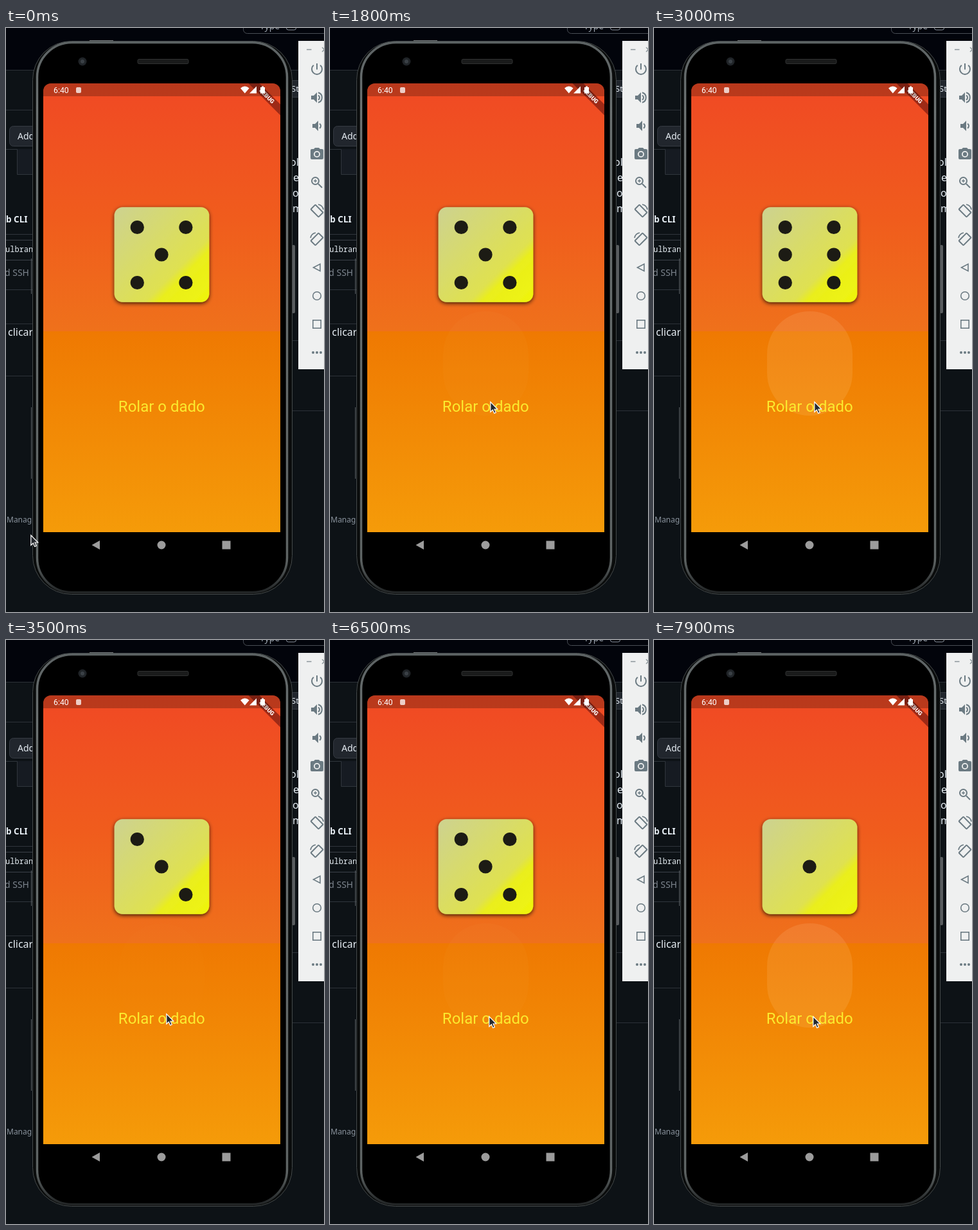
An HTML page for the animation above (8 s loop, 495 by 907 pixels).

```html
<!DOCTYPE html>
<html lang="pt">
<head>
<meta charset="utf-8">
<title>Rolar o dado</title>
<style>
  html, body { margin: 0; width: 100%; height: 100%; overflow: hidden; background: #0d1216; }
  svg { display: block; width: 495px; height: 907px; }
  .page { font-family: "Noto Sans", sans-serif; font-size: 14px; fill: #e6edf3; }
  .app { font-family: Roboto, sans-serif; }
  .icon { fill: none; stroke: #6b7a82; stroke-width: 2; }
  .icon .solid { fill: #6b7a82; stroke: none; }
</style>
</head>
<body>
<svg viewBox="0 0 495 907">
  <defs>
    <linearGradient id="sky" gradientUnits="userSpaceOnUse" x1="0" y1="86" x2="0" y2="783">
      <stop offset="0" stop-color="#f04924"/>
      <stop offset=".3" stop-color="#f05c1d"/>
      <stop offset=".552" stop-color="#ef711b"/>
      <stop offset=".553" stop-color="#ef7902"/>
      <stop offset="1" stop-color="#f59b09"/>
    </linearGradient>
    <linearGradient id="face" x1="0" y1="0" x2="1" y2="1">
      <stop offset="0" stop-color="#cdd290"/>
      <stop offset=".66" stop-color="#dfe150"/>
      <stop offset=".73" stop-color="#eaee1c"/>
      <stop offset="1" stop-color="#eff50d"/>
    </linearGradient>
    <linearGradient id="rim" x1="0" y1="0" x2="0" y2="1">
      <stop offset="0" stop-color="#5c6263"/>
      <stop offset=".12" stop-color="#6c7272"/>
      <stop offset=".94" stop-color="#5e6464"/>
      <stop offset="1" stop-color="#222526"/>
    </linearGradient>
    <filter id="shadow" x="-20%" y="-20%" width="140%" height="140%">
      <feDropShadow dx="0" dy="2" stdDeviation="3" flood-opacity=".75"/>
    </filter>
    <clipPath id="screen"><path d="M58 783V98a12 12 0 0 1 12-12H415a12 12 0 0 1 12 12V783z"/></clipPath>
  </defs>

  <!-- page behind the phone -->
  <g class="page">
    <rect width="495" height="907" fill="#0d1216"/>
    <rect width="495" height="65" fill="#02040b"/>
    <path d="M0 65.500H495M0 127.500H60M0 459.500H60M0 540.500H60M440 485.500H495M440 594.500H495" stroke="#2c3138"/>
    <rect x="369.500" y="-20" width="140" height="28.500" rx="6" fill="none" stroke="#4a4f56"/>
    <text x="395" y="2" fill="#9aa2ab">Type</text>
    <rect x="436.500" y="-12" width="15" height="15" rx="3" fill="none" stroke="#8b929b"/>
    <rect x="5.500" y="152.500" width="60" height="31" rx="6" fill="#21262d" stroke="#363b42"/>
    <text x="18" y="173" font-weight="500">Add</text>
    <path d="M17.500 188V227.500H60V188z" fill="#161b22"/>
    <path d="M0 188.500H17.500V227.500H60M0 320.500H60M0 406.500H60" fill="none" stroke="#30363d"/>
    <text x="0" y="302" font-size="13.500" font-weight="600">b CLI</text>
    <path d="M0 329.500H60M0 360.500H60" stroke="#3b4149"/>
    <text x="-1" y="348" font-family="Noto Sans Mono, monospace" font-size="12">ulbran</text>
    <text x="-2" y="385" fill="#7d858e">d SSH</text>
    <path d="M39.500 358V413M39.500 589V700" stroke="#5a5f64"/>
    <text x="3" y="478" font-size="16">clicar</text>
    <text x="1" y="768" font-size="12" fill="#8b949e">Manag</text>
    <rect x="430" y="81.500" width="40" height="26" rx="5" fill="#21262d" stroke="#363b42"/>
    <text x="444" y="99" font-size="13">St</text>
    <g font-size="16">
      <text x="442" y="214">ol</text><text x="447" y="238">e</text>
      <text x="446" y="262">o</text><text x="446" y="286">m</text>
    </g>
  </g>

  <!-- phone body -->
  <path d="M130 19.500H167" stroke="#777c7d"/>
  <rect x="445" y="337" width="5" height="106" rx="2" fill="#595d5f"/>
  <rect x="41.500" y="20.500" width="404" height="859" rx="60" fill="#0a0c0c" stroke="#454a4b"/>
  <rect x="48.500" y="22.500" width="389" height="854" rx="54" fill="#000" stroke="url(#rim)" stroke-width="3.500"/>
  <circle cx="119" cy="52" r="6.500" fill="#202428"/>
  <circle cx="119" cy="52" r="3" fill="#3a4046"/>
  <rect x="205" y="48.500" width="79" height="7" rx="2" fill="#1a1b1b" stroke="#303232"/>

  <!-- app -->
  <g class="app" clip-path="url(#screen)">
    <rect x="58" y="86" width="369" height="697" fill="url(#sky)"/>
    <g transform="translate(427 86) rotate(45)">
      <rect x="-45" y="23" width="90" height="12" fill="#7d1c12" fill-opacity=".7"/>
      <text x="-1" y="31.800" text-anchor="middle" font-size="9" font-weight="900" fill="#fff">DEBUG</text>
    </g>
    <rect x="58" y="86" width="369" height="20" fill="#000" fill-opacity=".23"/>
    <g fill="#fff">
      <text x="74" y="101" font-size="12.300">6:40</text>
      <rect x="109" y="92" width="8" height="9" rx="2" opacity=".75"/>
      <path d="M365 93.500Q371.800 87.500 378.600 93.500L371.800 101.500z"/>
      <path d="M379 101.500H390V90.500z"/>
      <path d="M396 92h2v-1.500h3V92h2v9.500h-7z"/>
    </g>
    <rect id="ink" x="176" y="440" width="133" height="162" rx="66" fill="#fff0c8" opacity="0"/>
    <rect x="168.700" y="278.300" width="147.600" height="147.400" rx="13" fill="url(#face)" filter="url(#shadow)"/>
    <g id="pips" fill="#1c1b14"></g>
    <text x="242.300" y="596" text-anchor="middle" font-size="24" fill="#fbea2f">Rolar o dado</text>
  </g>
  <g fill="#9c9c9c">
    <path d="M133.500 803L146 796V810z"/>
    <circle cx="242" cy="803" r="6.500"/>
    <rect x="336.500" y="796.500" width="13" height="13"/>
  </g>

  <!-- emulator toolbar -->
  <rect x="455" y="20" width="40" height="510" fill="#eff0f0"/>
  <path d="M468 33.500H475.500M492 30L499 37M499 30L492 37" stroke="#8b959a" stroke-width="1.300"/>
  <g id="tools" class="icon"></g>

  <path id="cursor" d="M.8 .8V16.300L4.300 13L6.700 18.400L9.300 17.300L7 12H11.800z" fill="#24282d" stroke="#fff" stroke-width="1.200"/>
</svg>
<script>
const $ = id => document.getElementById(id);

// Toolbar icons on a 24 unit grid, 44 px apart
const speaker = x => `<path class="solid" d="M${x} 9v6h4l5 5V4l-5 5z"/>`;
const turn = '<rect x="7" y="3.500" width="10" height="17" rx="1" transform="rotate(-45 12 12)"/><path d="M14 2a10 10 0 0 1 8 8" stroke-width="1.600"/>';
const icons = [
  '<path d="M12 3v9.500M6.800 5.800a8 8 0 1 0 10.400 0"/>',
  speaker(3) + '<path d="M14 8.500a4 4 0 0 1 0 7M14 4.300a8 8 0 0 1 0 15.400"/>',
  speaker(5) + '<path d="M16 8.500a4 4 0 0 1 0 7"/>',
  '<path class="solid" fill-rule="evenodd" d="M9 2L7 4H4a2 2 0 0 0-2 2v12a2 2 0 0 0 2 2h16a2 2 0 0 0 2-2V6a2 2 0 0 0-2-2h-3l-2-2zM12 7a5 5 0 1 1 0 10a5 5 0 1 1 0-10z"/><circle class="solid" cx="12" cy="12" r="3.200"/>',
  '<circle cx="9.500" cy="9.500" r="5.500"/><path d="M14 14l6 6"/><path d="M7 9.500h5M9.500 7v5" stroke-width="1.300"/>',
  turn,
  `<g transform="matrix(-1 0 0 1 24 0)">${turn}</g>`,
  '<path d="M6.500 12L17 6.500v11z" stroke-width="1.600"/>',
  '<circle cx="12" cy="12" r="6.300" stroke-width="1.600"/>',
  '<rect x="5.800" y="5.800" width="12.400" height="12.400" stroke-width="1.600"/>',
  [6, 12, 18].map(x => `<circle class="solid" cx="${x}" cy="12" r="2"/>`).join('')
];
$('tools').innerHTML = icons.map((s, i) => `<g transform="translate(472 ${52 + 44 * i})">${s}</g>`).join('');

// Pip cells of the 3 x 3 grid, counted row by row
const faces = { 1: [4], 3: [0, 4, 8], 5: [0, 2, 4, 6, 8], 6: [0, 2, 3, 5, 6, 8] };
const drawFace = n => faces[n].map(c =>
  `<circle cx="${204.3 + 37.8 * (c % 3)}" cy="${[309.5, 352, 395.5][c / 3 | 0]}" r="10.600"/>`).join('');

// [press time, face rolled]
const rolls = [[1800, 6], [2900, 3], [5300, 5], [6500, 1], [7800, 1]];
const inkSteps = [.02, .1, .1, .07, .03, .015, .005];

// [time, x, y]
const path = [
  [0, 38, 787], [100, 55, 770], [300, 145, 693], [600, 243, 618], [900, 249, 584], [1100, 249, 580],
  [4500, 249, 580], [4600, 260, 582], [4700, 254, 584], [4800, 247, 584], [8000, 247, 584]
];

function cursorAt(t) {
  const i = path.findIndex(p => p[0] > t);
  const [a, b] = [path[i - 1], path[i]];
  const k = (t - a[0]) / (b[0] - a[0]);
  return [1, 2].map(j => a[j] + (b[j] - a[j]) * k);
}

let shown;
function frame(now) {
  const t = Math.floor(now % 8000 / 100) * 100;
  let face = 5, ink = 0;
  for (const [start, result] of rolls) {
    if (t >= start + 200) face = result;
    ink += inkSteps[(t - start) / 100] || 0;
  }
  if (face !== shown) $('pips').innerHTML = drawFace(shown = face);
  $('ink').setAttribute('opacity', ink);
  $('cursor').setAttribute('transform', `translate(${cursorAt(t)})`);
  requestAnimationFrame(frame);
}
frame(performance.now());
</script>
</body>
</html>
```
